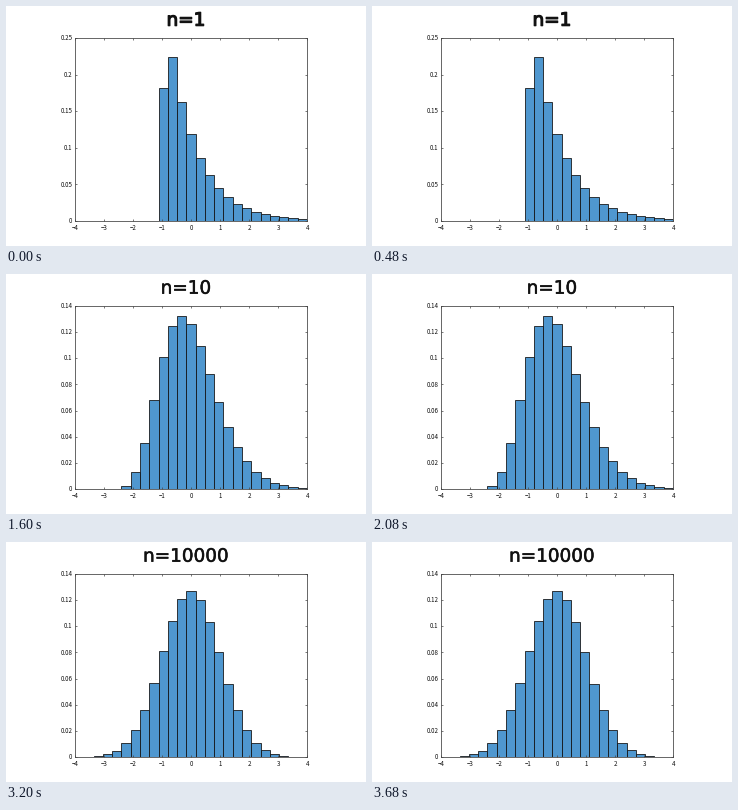
A matplotlib script that plays this animation: 360 px wide and 240 px high, repeating every 4000 ms.

```python
import math
import numpy as np
import matplotlib.pyplot as plt
from matplotlib import patheffects
from matplotlib.animation import FuncAnimation

W, H, DPI = 360, 240, 100
PX = 72 / DPI  # points per pixel
LEFT, RIGHT, TOP, BOTTOM = 69, 301, 32, 215
BINS, SUB = 25, 64
BIN_W = 8 / BINS
BLUE, INK, FRAME = "#4f97cf", "#111111", "#444444"
SIZES = [1, 4, 10, 1000, 10000]

fig = plt.figure(figsize=(W / DPI, H / DPI), dpi=DPI, facecolor="white")
ax = fig.add_axes([LEFT / W, 1 - BOTTOM / H,
                   (RIGHT - LEFT) / W, (BOTTOM - TOP) / H])


def bin_masses(n):
    """Histogram of the standardised sum of n exponential variables."""
    x = -4 + (np.arange(BINS * SUB) + 0.5) * BIN_W / SUB
    g = n + math.sqrt(n) * x
    safe = np.maximum(g, 1e-9)
    log_pdf = (n - 1) * np.log(safe) - safe - math.lgamma(n)
    pdf = np.where(g > 0, np.exp(log_pdf), 0) * math.sqrt(n)
    return pdf.reshape(BINS, SUB).mean(axis=1) * BIN_W


def label(x, y, text, ha):
    return fig.text(x / W, 1 - y / H, text, ha=ha, va="baseline",
                    family="Noto Sans CJK JP", size=6.2 * PX, color=INK)


for tick in range(-4, 5):
    x = LEFT + 0.5 + (tick + 4) * (RIGHT - LEFT) / 8
    label(x, 223.7, str(tick).replace("-", "\u2212"), "center")

title = fig.text(180 / W, 1 - 19.7 / H, "", ha="center", va="baseline",
                 family="DejaVu Sans", size=18.4 * PX, color=INK)
y_labels = []


def draw(i):
    n = SIZES[i]
    ax.clear()
    while y_labels:
        y_labels.pop().remove()

    masses = bin_masses(n)
    lefts = -4 + BIN_W * np.arange(BINS)
    shown = masses > 0.0005
    ax.bar(lefts[shown], masses[shown], width=BIN_W, align="edge",
           facecolor=BLUE, edgecolor=INK, linewidth=0.8 * PX)

    step = 0.05 if n < 10 else 0.02
    count = math.ceil(masses.max() / step)
    top = count * step
    ticks = np.arange(count + 1) * step
    ax.set(xlim=(-4, 4), ylim=(0, top), xticks=range(-4, 5), yticks=ticks)
    ax.tick_params(direction="in", top=True, right=True, length=2.3 * PX,
                   width=0.7 * PX, color=FRAME, labelleft=False,
                   labelbottom=False)
    for spine in ax.spines.values():
        spine.set(linewidth=0.8 * PX, color=FRAME)

    for t in ticks:
        y = BOTTOM - t / top * (BOTTOM - TOP)
        y_labels.append(label(66.3, y + 2.2, f"{t:g}", "right"))

    title.set_text(f"n={n}")
    weight = 1.2 if n == 1 else 0.5
    title.set_path_effects([
        patheffects.withStroke(linewidth=weight * PX, foreground=INK)])
    return []


anim = FuncAnimation(fig, draw, frames=len(SIZES), interval=800,
                     init_func=lambda: [], repeat=True, repeat_delay=0)
plt.show()
```
